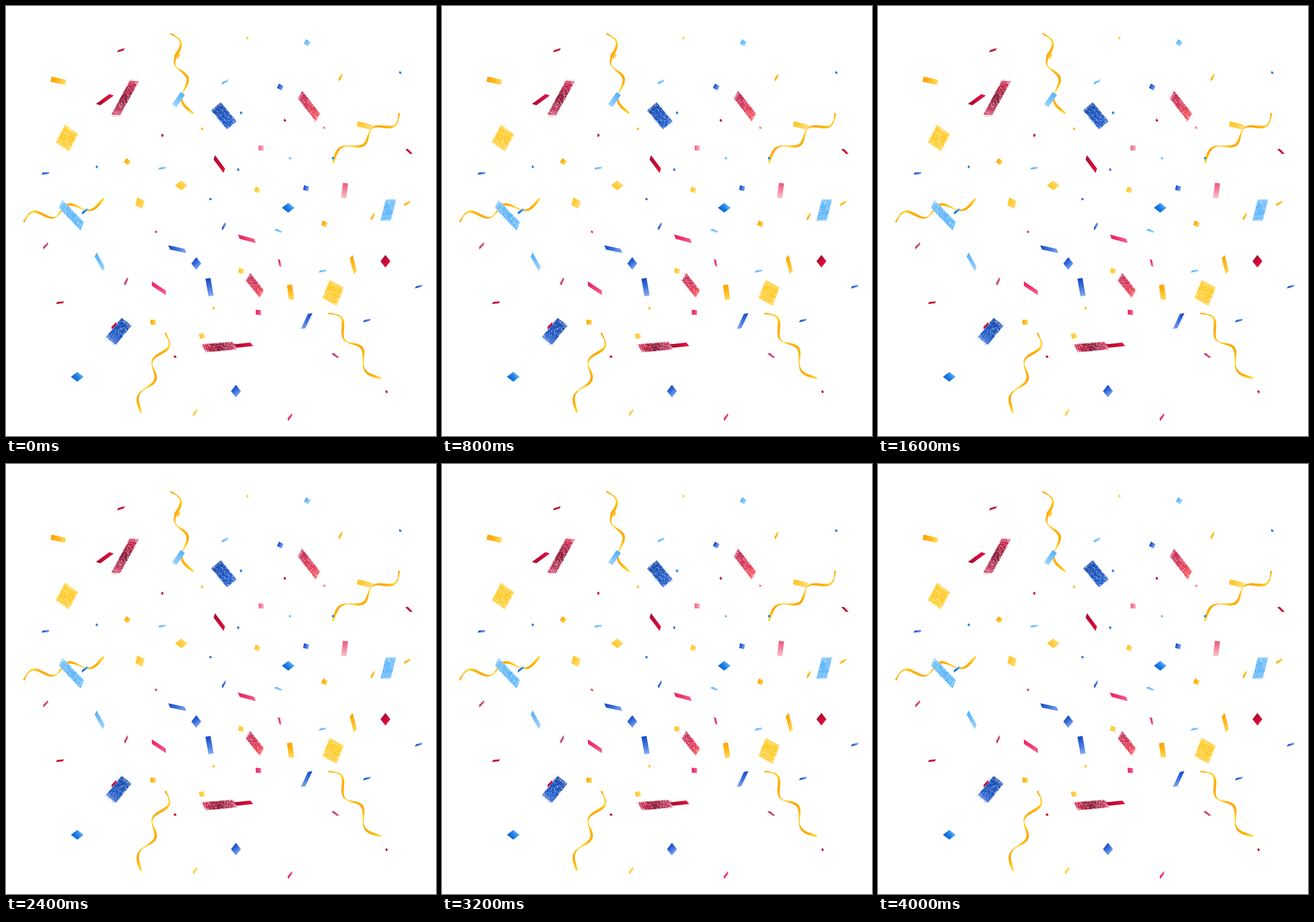
These frames come from a looping animation (748 px wide and 748 px high, 4.04 s). An HTML page:

```html
<!DOCTYPE html>
<html lang="en">
<head>
<meta charset="utf-8">
<title>Confetti</title>
<style>
  html, body { margin: 0; width: 100%; height: 100%; overflow: hidden; background: #fff; }
  svg { display: block; width: 100%; height: 100%; }
</style>
</head>
<body>
<svg viewBox="0 0 748 748"><defs id="defs"></defs><g id="confetti"></g></svg>
<script>
const NS = 'http://www.w3.org/2000/svg';
const defs = document.getElementById('defs');
const confetti = document.getElementById('confetti');

const LOOP = 4040, STEP = 400;
const TURN = 'rotate(-10 377 383.5)';

// Every piece is a parallelogram; lean is the angle between its two edges.
const cuts = {
  strip: { len: 26, wide: 9, lean: 90 },
  slip: { len: 29, wide: 8, lean: 55 },
  sliver: { len: 12, wide: 4.5, lean: 130 },
  diamond: { len: 14, wide: 14, lean: 76 },
  chip: { len: 9, wide: 8.5, lean: 85 },
  crumb: { len: 4.2, wide: 3.6, lean: 75 },
  bar: { len: 54, wide: 15.5, lean: 67 },
  sheet: { len: 43, wide: 22, lean: 90 },
  card: { len: 34, wide: 28, lean: 98 },
  ticket: { len: 38, wide: 18, lean: 75 }
};

// Spots are x, y, angle and, where it differs from the cut, length.
const glitter = [
  { colors: ['#e03158', '#8d1e3c', '#dd5377'], bar: [[207,160,119,68], [371,593,-5]] },
  { colors: ['#c22e55', '#d83a5b', '#ff5359'], bar: [[527,174,52,50], [433,486,51,38]] },
  { colors: ['#1c4fae', '#1d56bf', '#2c66d0'], sheet: [[379,191,50], [196,566,129]] },
  { colors: ['#ffd036', '#ffcb2b', '#ffd34a'], card: [[106,230,118], [569,499,111]] },
  { colors: ['#74c0fb', '#5fb6fb', '#6dbdfb'], bar: [[114,364,46]], ticket: [[665,355,104]] }
];

const paper = [
  { colors: ['#ffa200', '#ffb91f', '#ffdc62'],
    strip: [[91,130,13], [495,498,82]], slip: [[604,450,76]],
    sliver: [[582,124,-60], [698,343,-30], [638,366,-60]],
    chip: [[211,271,40], [298,86,35], [554,379,25], [256,550,0]],
    crumb: [[341,214], [361,526]] },
  { colors: ['#ffc526', '#ffcf45', '#ffe07c'],
    strip: [[624,208,14]], sliver: [[329,707,-54]],
    diamond: [[305,312,-38], [233,343,27]],
    chip: [[437,320,25], [409,461,20], [341,574,-10]], crumb: [[420,56]] },
  { colors: ['#a30f35', '#c80b35', '#e8123f'],
    slip: [[172,163,-36], [371,275,53], [413,590,-6]],
    sliver: [[200,77,-17], [701,253,45], [94,516,-5], [188,556,-45]],
    diamond: [[660,444,52]],
    crumb: [[272,225], [485,199], [294,610], [662,671]] },
  { colors: ['#c4305a', '#d96a86'],
    sliver: [[573,608,38], [209,479,-62], [69,417,-45]], crumb: [[261,393]] },
  { colors: ['#ea1f5c', '#ef3b70', '#f7648f'],
    slip: [[419,405,15], [266,491,33]], sliver: [[494,715,-53], [476,447,80]],
    chip: [[439,533,5]] },
  { colors: ['#f0587f', '#f5899f', '#fbbfca'],
    strip: [[589,321,97]], chip: [[444,247,0]], crumb: [[554,212]] },
  { colors: ['#1148c4', '#3f74df', '#86abf2'],
    strip: [[354,489,80,31]], slip: [[298,423,12], [523,548,115]],
    sliver: [[69,291,-4], [379,383,-60], [628,547,-13], [718,488,-15]],
    diamond: [[331,448,52], [400,670,52]],
    chip: [[477,141,30], [522,317,15]], crumb: [[356,336], [404,285]] },
  { colors: ['#0b62d2', '#1d7fe6', '#62b8fb'],
    sliver: [[137,357,-35]], diamond: [[491,351,-38], [124,645,-38]],
    crumb: [[409,186], [686,116], [158,280], [569,265]] },
  { colors: ['#55b1fb', '#78c2fc', '#a5d7fd'],
    strip: [[300,163,125]], slip: [[163,445,61]],
    sliver: [[381,132,-25], [272,282,-6], [551,461,-8], [474,391,25]],
    chip: [[524,64,35]], crumb: [[494,265]] }
];

const streamers = [[286,48,74], [684,186,143], [31,376,-16.5], [277,569,107], [561,535,51]];

let seed = 7;
function random() {
  seed = (seed * 16807) % 2147483647;
  return seed / 2147483647;
}

function add(parent, tag, attrs) {
  const el = document.createElementNS(NS, tag);
  for (const key in attrs) el.setAttribute(key, attrs[key]);
  return parent.appendChild(el);
}

function gradient(colors, reach = 1) {
  const id = 'g' + defs.children.length;
  const el = add(defs, 'linearGradient', { id, x2: reach, spreadMethod: 'reflect' });
  colors.forEach((color, i) =>
    add(el, 'stop', { offset: i / (colors.length - 1), 'stop-color': color }));
  return `url(#${id})`;
}

const place = (x, y, angle) =>
  add(confetti, 'g', { transform: `translate(${x} ${y}) rotate(${angle})` });

// Maps u, v in -1..1 to a point of the parallelogram.
function mapper({ wide, lean }, len) {
  const a = lean * Math.PI / 180;
  return (u, v) => [(u * len + v * wide * Math.cos(a)) / 2, v * wide * Math.sin(a) / 2];
}

function drawPiece(cut, fill, [x, y, angle = random() * 90, len = cut.len]) {
  const at = mapper(cut, len);
  const group = place(x, y, angle);
  const points = [at(-1, -1), at(1, -1), at(1, 1), at(-1, 1)].join(' ');
  add(group, 'polygon', { points, fill });
  return { group, at, area: len * cut.wide };
}

function drawGlitter(cut, fill, spot) {
  const { group, at, area } = drawPiece(cut, fill, spot);
  const inside = () => random() * 2 - 1;
  const rim = () => {
    const edge = (random() < 0.5 ? -1 : 1) * (0.86 + random() * 0.26);
    return random() < 0.5 ? [edge, inside()] : [inside(), edge];
  };
  const dots = (density, size, pick, color, opacity) => {
    let d = '';
    for (let i = 0; i < area * density; i++) {
      const [x, y] = at(...pick());
      d += `M${x.toFixed(1)} ${y.toFixed(1)}h${size}v${size}h-${size}z`;
    }
    add(group, 'path', { d, fill: color, opacity });
  };
  dots(0.12, 1.1, () => [inside(), inside()], '#fff', 0.7);
  dots(0.15, 1.1, rim, '#fff', 0.7);
  dots(0.08, 0.9, rim, fill, 0.5);
}

// One twisted wave, shared by all streamers.
function wavePoint(s) {
  const p = 2 * Math.PI * (s + 0.05 * Math.sin(Math.PI * s * s));
  return [144.5 * s, -10 * Math.sin(2 * p) - 4 * Math.sin(p)];
}

function streamerShape() {
  const left = [], right = [], steps = 90;
  for (let i = 0; i <= steps; i++) {
    const s = i / steps;
    const [x, y] = wavePoint(s), [nx, ny] = wavePoint(s + 0.001);
    const turn = Math.atan2(ny - y, nx - x);
    const half = 0.7 + 1.5 * Math.abs(Math.sin(Math.PI * (s - 0.06) / 0.34));
    const dx = half * Math.sin(turn), dy = half * Math.cos(turn);
    left.push([x - dx, y + dy]);
    right.unshift([x + dx, y - dy]);
  }
  return [...left, ...right].join(' ');
}

function drawAll(sets, draw) {
  for (const { colors, ...kinds } of sets) {
    const fill = gradient(colors);
    for (const kind in kinds) kinds[kind].forEach(spot => draw(cuts[kind], fill, spot));
  }
}

const ribbon = { points: streamerShape(), fill: gradient(['#ffa600', '#ffb300', '#ffd838'], 0.14) };
streamers.forEach(spot => add(place(...spot), 'polygon', ribbon));
drawAll(glitter, drawGlitter);
drawAll(paper, drawPiece);

const start = performance.now();
function render() {
  const t = Math.max(0, performance.now() - start) % LOOP;
  const turned = Math.floor(t / STEP) % 2 === 1;
  confetti.setAttribute('transform', turned ? TURN : '');
  requestAnimationFrame(render);
}
render();
</script>
</body>
</html>
```
